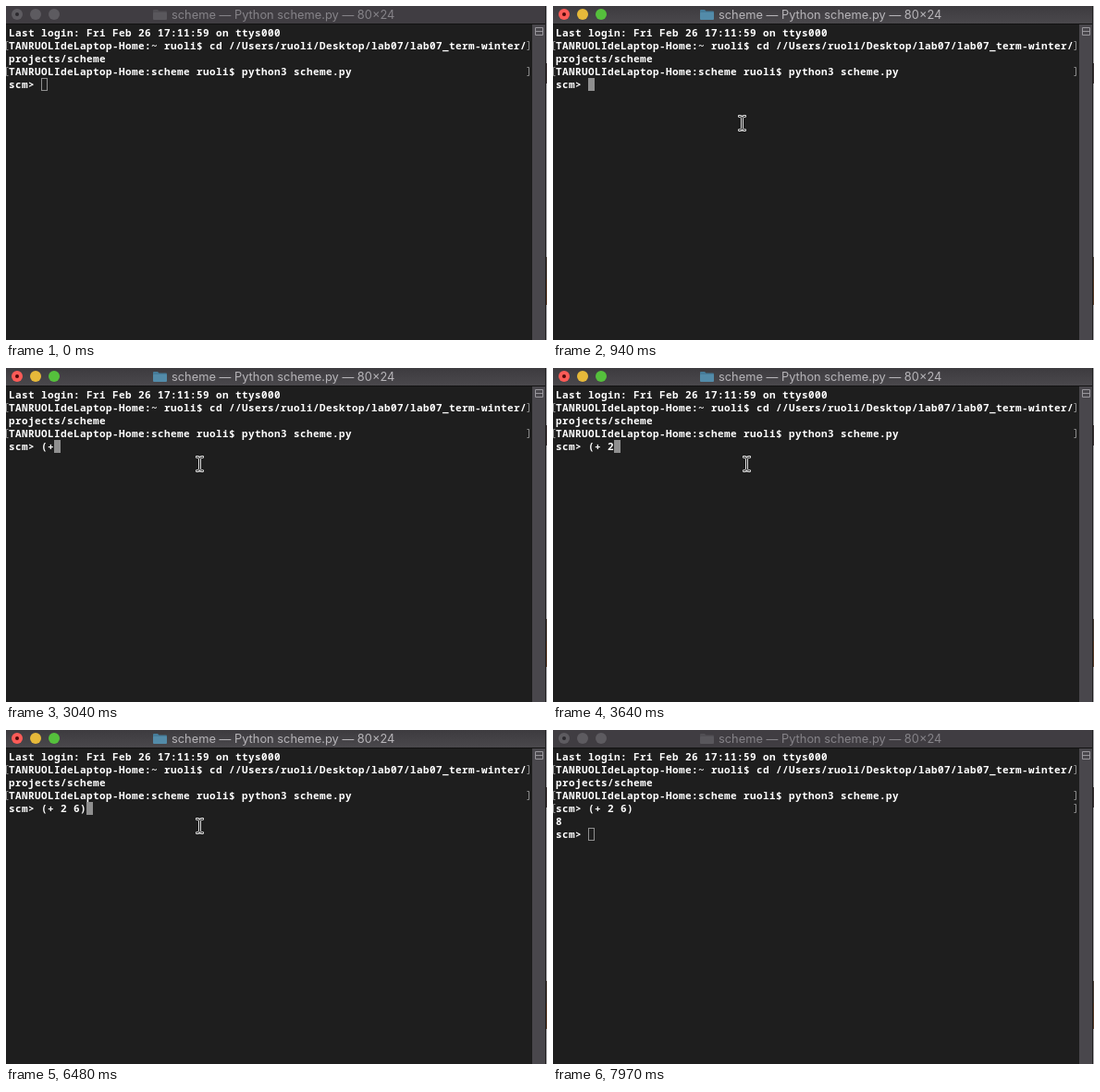
An HTML page for the animation above (8000 ms loop, 585x362 px).

```html
<!DOCTYPE html>
<html lang="en">
<head>
<meta charset="utf-8">
<title>Terminal</title>
<style>
  html, body { margin: 0; width: 100%; height: 100%; overflow: hidden; background: #1e1e1e; }
  svg { display: block; width: 585px; height: 362px; }
  .term text {
    font: 600 11px "Noto Sans Mono", "DejaVu Sans Mono", monospace;
    letter-spacing: .4px;
    white-space: pre;
    fill: #fff;
  }
  .title { font: 400 12.85px Inter, "Open Sans", sans-serif; fill: #858388; }
  .bar { fill: #403d42; }
  .light { fill: #5d5b60; }
  .dot { fill: #2b292d; }
  .folder { fill: #59575c; }
  .flap { fill: #504e53; }
  .block { fill: none; stroke: #8f8f8f; }
  .brackets { fill: none; stroke: #8c8c8c; }

  .active .title { fill: #b7b5b9; }
  .active .bar { fill: url(#shade); }
  .active .red { fill: #fc5b57; }
  .active .yellow { fill: #e6b93a; }
  .active .green { fill: #55c03c; }
  .active .dot { fill: #4d0808; }
  .active .folder { fill: #538ba9; }
  .active .flap { fill: #467c9a; }
  .active .block { fill: #8f8f8f; }
</style>
</head>
<body>
<svg id="stage" viewBox="0 0 585 362">
  <defs>
    <linearGradient id="shade" x2="0" y2="1">
      <stop stop-color="#3d3b3f"/>
      <stop offset="1" stop-color="#4a484c"/>
    </linearGradient>
  </defs>
  <rect width="585" height="362" fill="#1e1e1e"/>

  <!-- desktop behind the right edge -->
  <rect x="584" width="1" height="362" fill="#a9a8ac"/>
  <rect x="584" y="62" width="1" height="22" fill="#3b3335"/>
  <rect x="584" y="272" width="1" height="24" fill="#4c4038"/>
  <rect x="584" y="296" width="1" height="28" fill="#5a3c2a"/>

  <!-- scroll bar -->
  <rect x="569" y="20" width="14" height="342" fill="#49474c"/>
  <path d="M572.5 23.5h8v8h-8zM572.5 27.5h8" fill="none" stroke="#99979c"/>

  <!-- title bar -->
  <rect class="bar" width="583" height="19"/>
  <rect y="19" width="583" height="1" fill="#121212"/>
  <circle class="light red" cx="12" cy="9" r="6"/>
  <circle class="light yellow" cx="32" cy="9" r="6"/>
  <circle class="light green" cx="52" cy="9" r="6"/>
  <circle class="dot" cx="12" cy="9" r="2"/>
  <path class="flap" d="M159 14V5q0-1 1-1h4l1.5 1.5H173q1 0 1 1V8z"/>
  <rect class="folder" x="159" y="7" width="15" height="8" rx="1"/>
  <text class="title" x="179" y="14">scheme — Python scheme.py — 80×24</text>

  <g class="term">
    <text x="3" y="33">Last login: Fri Feb 26 17:11:59 on ttys000</text>
    <text x="3" y="47">TANRUOLIdeLaptop-Home:~ ruoli$ cd //Users/ruoli/Desktop/lab07/lab07_term-winter/</text>
    <text x="3" y="61">projects/scheme</text>
    <text x="3" y="75">TANRUOLIdeLaptop-Home:scheme ruoli$ python3 scheme.py</text>
    <text x="3" y="89" id="input"></text>
    <g id="result">
      <text x="3" y="103">8</text>
      <text x="3" y="117">scm&gt; </text>
    </g>
  </g>

  <g class="brackets">
    <path id="pair" d="M2.5 38.5h-2v9h2M563.5 38.5h2v9h-2"/>
    <use href="#pair" y="28"/>
    <use href="#pair" y="42" id="inputPair"/>
  </g>
  <rect class="block" id="block" x=".5" y=".5" width="6" height="13"/>

  <g id="mouse" fill="none" stroke-linecap="round" stroke-linejoin="round">
    <defs>
      <path id="beam" d="M-3.2-7.6Q0-7.6 0-5Q0-7.6 3.2-7.6M0-5V5M-3.2 7.6Q0 7.6 0 5Q0 7.6 3.2 7.6"/>
    </defs>
    <use href="#beam" stroke="#f4f4f4" stroke-width="2.8"/>
    <use href="#beam" stroke="#161616"/>
  </g>
</svg>

<script>
  const LOOP = 8000, FOCUS = 940, ENTER = 6780, BLUR = 7970;
  const CELL = 7, LINE = 14;
  const typed = "(+ 2 6)";
  const keyTimes = [1840, 3040, 3340, 3640, 4540, 5290, 6480];

  // time, x, y; no position means hidden
  const mouseStops = [
    [0], [500, 262.5, 211.5], [650, 227.5, 155.5], [790, 204.5, 127],
    [1090, 209.5, 104], [7380, 231.5, 114], [7530, 461.5, 260], [7670]
  ];

  const el = id => document.getElementById(id);
  const show = (node, on) => node.setAttribute("visibility", on ? "visible" : "hidden");

  function draw(t) {
    const entered = t >= ENTER;
    const count = keyTimes.filter(k => k <= t).length;
    el("stage").classList.toggle("active", t >= FOCUS && t < BLUR);
    el("input").textContent = "scm> " + typed.slice(0, count);
    show(el("result"), entered);
    show(el("inputPair"), entered);

    const column = 5 + (entered ? 0 : count);
    const row = entered ? 6 : 4;
    el("block").setAttribute("transform", `translate(${3 + column * CELL} ${22 + row * LINE})`);

    const [, x, y] = mouseStops.filter(s => s[0] <= t).pop();
    show(el("mouse"), x !== undefined);
    if (x !== undefined) el("mouse").setAttribute("transform", `translate(${x} ${y})`);
  }

  function tick() {
    draw(performance.now() % LOOP);
    requestAnimationFrame(tick);
  }
  tick();
</script>
</body>
</html>
```
